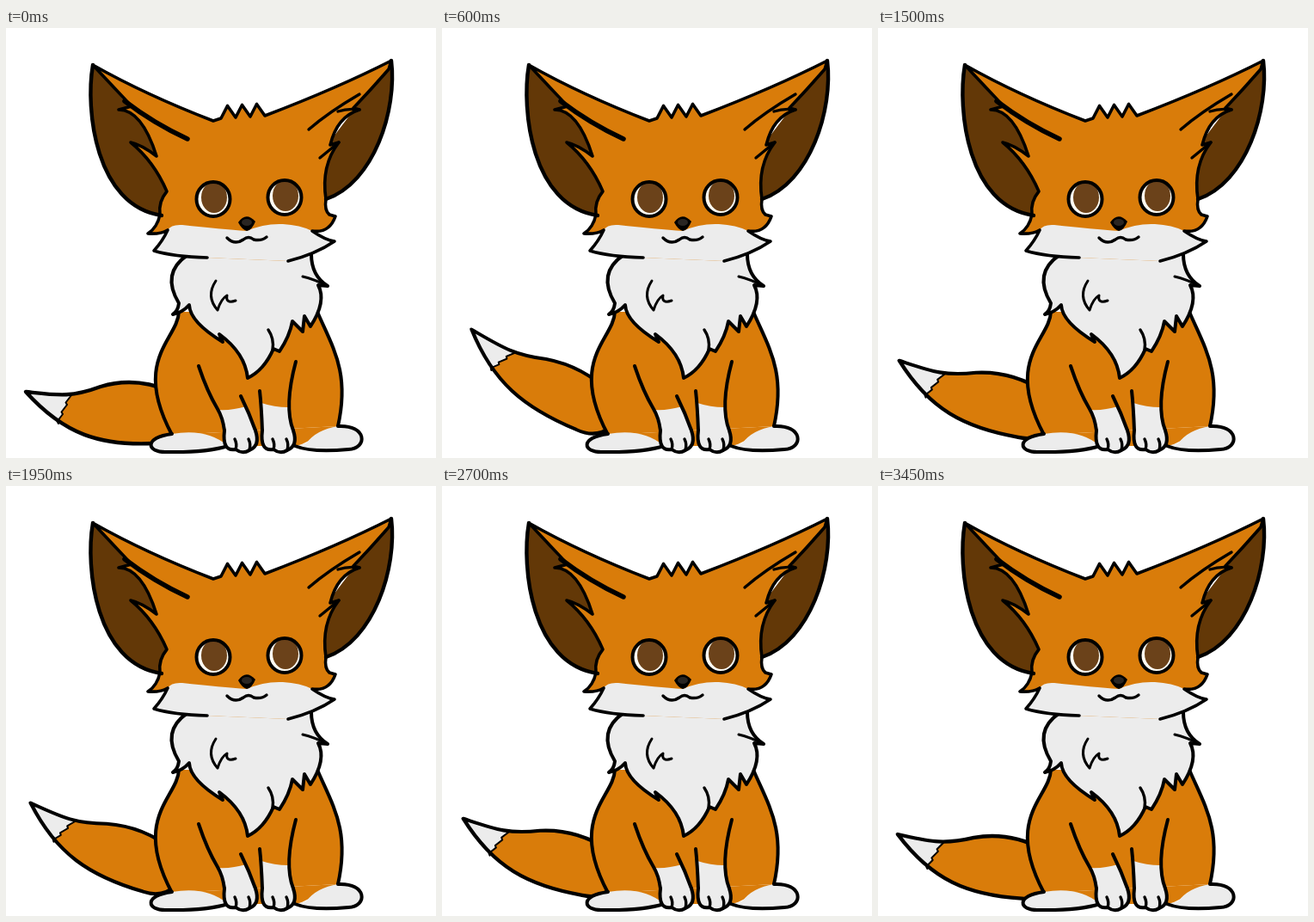
An HTML page with a canvas that plays this animation: 500 by 500 pixels, repeating every 3600 ms.

```html
<!DOCTYPE html>
<html lang="en">
<head>
<meta charset="utf-8">
<title>Fox</title>
<style>
html, body { margin: 0; width: 100%; height: 100%; overflow: hidden; background: #fff; }
canvas { display: block; width: 500px; height: 500px; }
</style>
</head>
<body>
<canvas id="stage" width="500" height="500"></canvas>
<script>
const ctx = document.getElementById('stage').getContext('2d');
const ORANGE = '#d97c0a', BROWN = '#633807', WHITE = '#ececec', INK = '#000';
const STEP = 150, STEPS = 24, SWING = 4, BLINK_STEP = 3;

const toPath = shape => typeof shape === 'string' ? new Path2D(shape) : shape;

function fill(shape, color) {
  ctx.fillStyle = color;
  ctx.fill(toPath(shape));
}

function line(shape, width = 4) {
  ctx.strokeStyle = INK;
  ctx.lineWidth = width;
  ctx.stroke(toPath(shape));
}

function fillInside(outline, shape, color) {
  ctx.save();
  ctx.clip(toPath(outline));
  fill(shape, color);
  ctx.restore();
}

function oval(x, y, rx, ry) {
  const path = new Path2D();
  path.ellipse(x, y, rx, ry, 0, 0, Math.PI * 2);
  return path;
}

// Zigzag of equal teeth from one point towards another.
function zigzag(x, y, dx, dy, teeth, depthX, depthY) {
  let path = '';
  for (let i = 1; i <= teeth; i++) {
    const midX = x + (i - 0.5) * dx + depthX, midY = y + (i - 0.5) * dy + depthY;
    path += `L${midX},${midY} L${x + i * dx},${y + i * dy} `;
  }
  return path;
}

// The tail swings about its root and stretches a little as it rises.
function drawTail(lift) {
  const tail = 'M205,462 Q195,483 172,483 C110,486 68,473 23,423 C60,427 75,430 110,417 Q150,405 190,422';
  const edge = 'M76,427 ' + zigzag(76, 427, -5, 11, 3, -4, 3);
  ctx.save();
  ctx.translate(190, 440);
  ctx.rotate(lift * 25 * Math.PI / 180);
  ctx.scale(1 + 0.07 * lift, 1 - 0.1 * lift);
  ctx.translate(-190, -440);
  fill(tail, ORANGE);
  fillInside(tail, edge + 'L0,470 L0,400 L76,410 Z', WHITE);
  line(edge, 2);
  line(tail, 4.4);
  ctx.restore();
}

function drawPaw(x) {
  const paw = 'M0,468 Q-3,493 13,490 Q21,496 29,491 Q42,486 36,468';
  ctx.save();
  ctx.translate(x, 0);
  fill(paw, WHITE);
  line(paw);
  line('M13,490 Q15,484 12,478 M29,491 Q31,484 28,478', 3.4);
  ctx.restore();
}

function drawBody() {
  const sides = 'M201,330 C200,362 146,385 193,473 L386,463 C400,400 380,372 362,330';
  fill(sides + ' L386,463 L340,486 L254,486 L193,473 Z', ORANGE);
  fill(sides, ORANGE);
  line('M201,330 C200,362 146,385 193,473 M386,463 C400,400 380,372 362,330');

  const leftFoot = 'M193,472 C160,476 163,494 187,493 Q232,494 258,486';
  fill(leftFoot + ' Q234,465 193,472', WHITE);
  line(leftFoot);
  const rightFoot = 'M386,463 C420,461 421,489 398,490 Q356,494 336,486';
  fill(rightFoot + ' L349,483 Q361,467 386,463', WHITE);
  line(rightFoot);

  fill('M246,444 Q263,445 279,440 L291,470 L254,470 Z', WHITE);
  fill('M297,436 Q312,441 328,441 L334,470 L298,470 Z', WHITE);
  line('M224,393 Q234,423 246,443 Q252,453 254,468');
  line('M273,428 Q283,448 290,468');
  line('M295,422 Q297,440 298,468');
  line('M337,388 Q323,440 334,468');
  drawPaw(254);
  drawPaw(298);
}

function drawChest() {
  const fur = 'M211,264 Q180,285 201,320 Q200,329 194,333 Q205,331 213,322 Q214,342 252,365 L248,356 '
    + 'Q278,378 281,407 Q300,398 311,373 L318,376 Q330,358 333,341 L345,353 L347,335 L354,347 '
    + 'Q373,318 363,299 L374,300 Q355,288 355,263';
  fill(fur, WHITE);
  line(fur);
  line('M305,351 Q312,361 310,374', 3.4);
  line('M345,289 Q358,292 374,300', 3);
  line('M244,294 Q232,312 246,328 Q250,315 257,311 Q255,321 267,317', 3);
}

function drawHead() {
  const leftEar = 'M101,43 C92,95 104,207 181,218';
  const rightEar = 'M448,38 C455,95 428,180 372,199';
  fill(leftEar + ' L240,200 Z', BROWN);
  fill(rightEar + ' L340,180 Z', BROWN);

  const rightSide = 'M328,271 Q360,263 382,248 Q372,247 356,236 Q376,239 383,219 L376,217 Q370,212 372,199 '
    + 'Q366,160 387,133 L377,136 Q385,103 411,95 L404,93 Q424,72 445,48 L448,38 ';
  const crown = 'Q385,70 301,102 ' + zigzag(301, 102, -17, 1, 3, -1, -14) + 'L241,108 Q163,78 101,43 ';
  const leftSide = 'L146,91 L131,95 Q158,95 175,149 Q158,136 145,133 Q172,155 187,190 '
    + 'Q177,202 179,217 Q176,232 165,239 Q180,240 188,235 Q182,248 172,259 Q195,266 234,267';
  const outline = rightSide + crown + leftSide;
  fill(outline, ORANGE);
  fillInside(outline, 'M188,235 Q192,228 205,229 Q250,234 280,236 Q300,227 322,228 Q342,229 356,236 '
    + 'L390,247 V290 H165 V259 Z', WHITE);
  line(outline, 3.6);
  line(leftEar, 4.4);
  line(rightEar, 4.4);
  line('M138,85 Q172,111 211,129', 5.5);
  line('M411,77 Q375,98 352,118 M386,97 Q398,93 411,95 M387,133 L365,151', 3.4);
}

function drawEye(x, y, closed) {
  if (closed) {
    line(`M${x - 20},${y + 3} Q${x},${y + 28} ${x + 20},${y + 3}`);
    return;
  }
  const ball = oval(x, y, 19.5, 20);
  fill(ball, '#fffdf3');
  fill(oval(x + 1, y - 2, 15, 18), '#6b421a');
  line(ball);
}

function drawFace(closed) {
  drawEye(241, 199, closed);
  drawEye(324, 197, closed);
  fill('M270,226 Q279,213 290,225 Q286,235 280,236 Q274,234 270,226', INK);
  fill(oval(280, 226, 6, 4), '#292522');
  line('M257,244 Q266,253 276,246 Q282,241 288,246 Q297,248 303,243', 3.4);
}

function draw(now) {
  const step = Math.floor(now / STEP) % STEPS;
  const lift = 1 - Math.abs(step % (2 * SWING) - SWING) / SWING;
  ctx.fillStyle = '#fff';
  ctx.fillRect(0, 0, 500, 500);
  ctx.lineCap = ctx.lineJoin = 'round';
  drawTail(lift);
  drawBody();
  drawChest();
  drawHead();
  drawFace(step === BLINK_STEP);
}

const start = performance.now();
function tick() {
  draw(performance.now() - start);
  requestAnimationFrame(tick);
}
tick();
</script>
</body>
</html>
```
